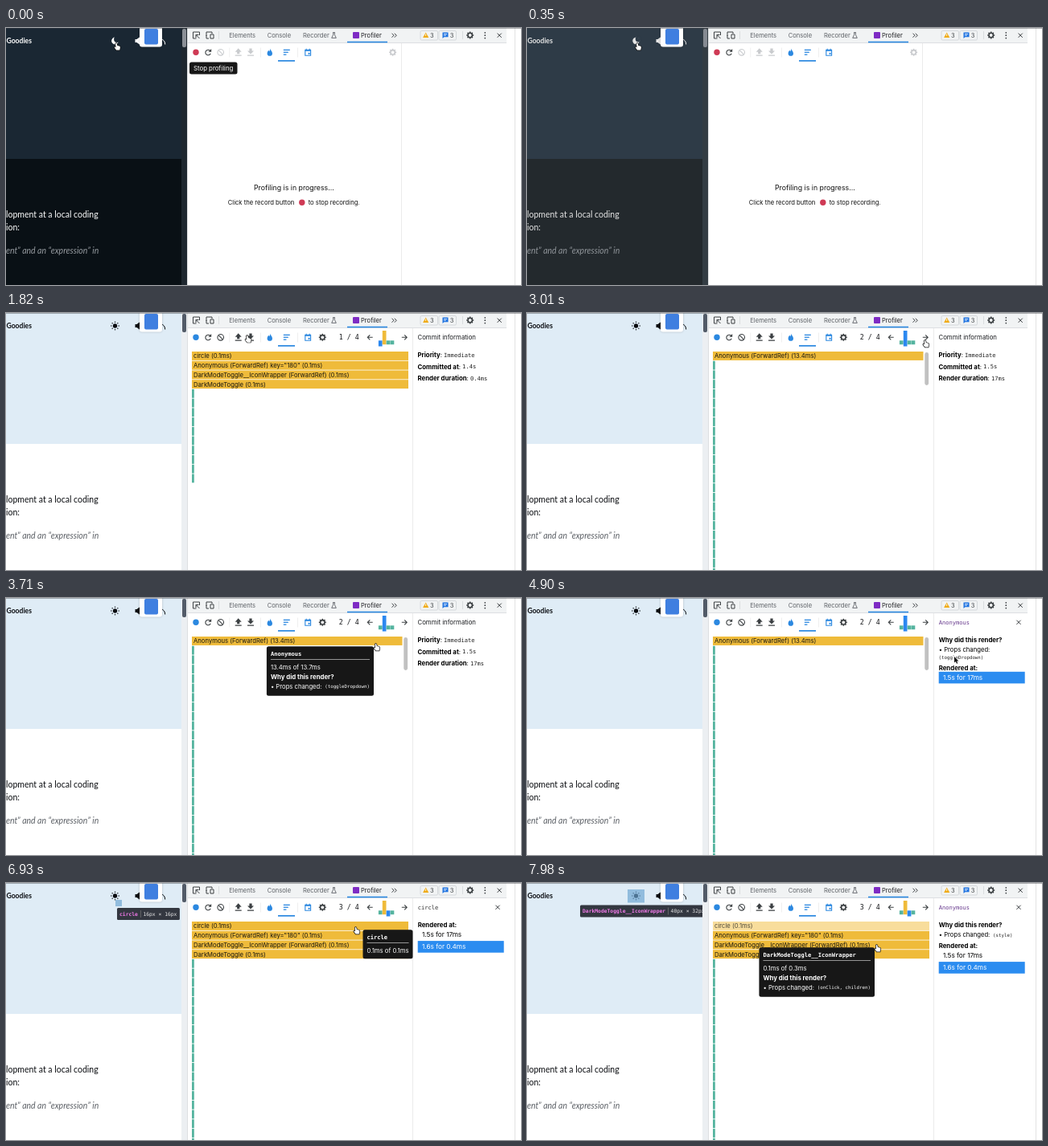
An HTML page with a canvas that plays this animation: 640 px wide and 320 px high, repeating every 8 s.

```html
<!DOCTYPE html>
<html lang="en">
<head>
<meta charset="utf-8">
<title>Profiler</title>
<style>
html, body { margin: 0; width: 100%; height: 100%; overflow: hidden; background: #fff; }
canvas { display: block; width: 640px; height: 320px; }
</style>
</head>
<body>
<canvas id="stage"></canvas>
<script>
const LOOP = 8000, STEP = 70;
const SANS = 'Inter, "Liberation Sans", sans-serif';
const MONO = '"DejaVu Sans Mono", monospace';
const PAGE = 'Lato, "Open Sans", sans-serif';
const BLUE = '#2b88e0', INK = '#3c4043', GOLD = '#efbb3a', TEAL = '#55b49f', RED = '#cf3a55';
const ROW = 11.73, TOP = 48;

const canvas = document.getElementById('stage');
const ctx = canvas.getContext('2d');
const dpr = window.devicePixelRatio || 1;
canvas.width = 640 * dpr;
canvas.height = 320 * dpr;

// Moments of the story
const THEME = 280, STOP = 1120, NEXT1 = 2310, PICK1 = 4060, NEXT2 = 5950, PICK2 = 6720, PICK3 = 7490;

const path = [
  [0, 137, 19], [420, 137, 19], [840, 231.5, 26], [1610, 231.5, 26], [2240, 494.5, 34],
  [3010, 494.5, 34], [3290, 478, 52], [3710, 459.5, 57], [4130, 459.5, 57], [4410, 510, 63],
  [4550, 510, 63], [4900, 531, 73], [5040, 531, 73], [5390, 486, 54], [5810, 494.5, 34],
  [6230, 494.5, 34], [6650, 437, 54], [6790, 434.5, 55], [7000, 434.5, 55], [7350, 434.5, 66],
  [7700, 434.5, 67], [7980, 434.5, 77]
];

const springRows = [
  { label: 'circle (0.1ms)', name: 'circle', time: '0.1ms of 0.1ms', box: [136, 21, 8, 8], size: '16px × 16px', tag: [138, 31] },
  { label: 'Anonymous (ForwardRef) key="180" (0.1ms)', name: 'Anonymous', time: '0.1ms of 0.2ms', props: '(style)', box: [136, 21, 8, 8], size: '16px × 16px', tag: [126.5, 31] },
  { label: 'DarkModeToggle__IconWrapper (ForwardRef) (0.1ms)', name: 'DarkModeToggle__IconWrapper', time: '0.1ms of 0.3ms', props: '(onClick, children)', box: [125, 8, 21, 16.5], size: '40px × 32px', tag: [66, 27.5] },
  { label: 'DarkModeToggle (0.1ms)', name: 'DarkModeToggle', time: '0.1ms of 0.4ms' }
];
const commits = {
  1: { rows: springRows, thin: 10, at: '1.4s', took: '0.4ms' },
  2: { rows: [{ label: 'Anonymous (ForwardRef) (13.4ms)', name: 'Anonymous', time: '13.4ms of 13.7ms', props: '(toggleDropdown)' }], thin: 23, scroll: true, at: '1.5s', took: '17ms' },
  3: { rows: springRows, thin: 20, at: '1.6s', took: '0.4ms' }
};

const clamp = v => Math.max(0, Math.min(1, v));
const ease = v => { v = clamp(v); return v * v * (3 - 2 * v); };

function mix(a, b, p) {
  return `rgb(${a.map((v, i) => Math.round(v + (b[i] - v) * p))})`;
}

function pointer(t) {
  let i = 0;
  while (i < path.length - 2 && t >= path[i + 1][0]) i++;
  const [t0, x0, y0] = path[i], [t1, x1, y1] = path[i + 1];
  const p = ease((t - t0) / (t1 - t0));
  return { x: x0 + (x1 - x0) * p, y: y0 + (y1 - y0) * p };
}

function rect(x, y, w, h, color) {
  ctx.fillStyle = color;
  ctx.fillRect(x, y, w, h);
}

function round(x, y, w, h, r, color) {
  ctx.fillStyle = color;
  ctx.beginPath();
  ctx.roundRect(x, y, w, h, r);
  ctx.fill();
}

function disc(x, y, r, color) {
  ctx.fillStyle = color;
  ctx.beginPath();
  ctx.arc(x, y, r, 0, 7);
  ctx.fill();
}

function ring(x, y, r, color, w = 1, from = 0, to = 7) {
  ctx.strokeStyle = color;
  ctx.lineWidth = w;
  ctx.beginPath();
  ctx.arc(x, y, r, from, to);
  ctx.stroke();
}

function shape(d, x, y, color, w) {
  const p = new Path2D(d);
  ctx.save();
  ctx.translate(x, y);
  if (w) {
    ctx.strokeStyle = color;
    ctx.lineWidth = w;
    ctx.stroke(p);
  } else {
    ctx.fillStyle = color;
    ctx.fill(p);
  }
  ctx.restore();
}

// y is the middle of the capitals; returns the right end
function text(s, x, y, color, size = 7.7, style = '', family = SANS) {
  ctx.font = `${style} ${size}px ${family}`;
  ctx.fillStyle = color;
  ctx.fillText(s, x, y + size * 0.36);
  return x + ctx.measureText(s).width;
}
const bold = (s, x, y, color, size = 7.8) => text(s, x, y, color, size, 'bold');
const mono = (s, x, y, color, size = 7.1, style = '') => text(s, x, y, color, size, style, MONO);

function gear(x, y, color) {
  ring(x, y, 2.7, color, 1.6);
  for (let k = 0; k < 8; k++) {
    const a = k * Math.PI / 4, c = Math.cos(a), s = Math.sin(a);
    shape(`M${c * 3} ${s * 3}L${c * 4.5} ${s * 4.5}`, x, y, color, 1.6);
  }
}

function cross(x, y) {
  shape('M-2.6-2.6L2.6 2.6M2.6-2.6L-2.6 2.6', x, y, INK, 1);
}

function drawPage(t) {
  const p = ease((t - THEME) / 350);
  const hero = mix([26, 39, 51], [223, 236, 246], p);
  const ink = mix([255, 255, 255], [10, 12, 16], p);
  rect(0, 0, 218, 320, mix([9, 16, 21], [255, 255, 255], p));
  rect(0, 0, 218, 163, hero);
  rect(218, 0, 7, 320, mix([30, 39, 47], [236, 239, 242], p));
  round(219, 1, 5, 23, 2, mix([139, 144, 151], [82, 91, 104], p));

  text('Goodies', 0.5, 16, ink, 8.6, 'bold', PAGE);
  text('lopment at a local coding', 0, 232.5, ink, 10.5, '', PAGE);
  text('ion:', 0, 248.5, ink, 10.5, '', PAGE);
  text('ent” and an “expression” in', 0, 277, mix([150, 155, 160], [92, 96, 102], p), 10.5, 'italic', PAGE);

  // moon turning into a sun
  disc(135.5, 16, 4.4 - 1.7 * p, ink);
  if (p < 1) disc(138 + p * 6, 14 - p * 4, 3.9, hero);
  ctx.globalAlpha = p;
  for (let k = 0; k < 8; k++) {
    const a = k * Math.PI / 4;
    disc(135.5 + Math.cos(a) * 4.7, 16 + Math.sin(a) * 4.7, 0.7, ink);
  }
  ctx.globalAlpha = 1;

  shape('M0-2H2L6-5V5L2 2H0Z', 160.5, 16, ink);
  ring(190.5, 20.5, 7.2, ink, 1, -1.3, 0);
  ctx.save();
  ctx.shadowColor = 'rgba(0,0,0,.2)';
  ctx.shadowBlur = 3 * dpr;
  round(166, -4, 28, 27.5, 3, '#fff');
  ctx.restore();
  round(172, 1, 17, 19.5, 2, '#3f7fe0');
}

function drawTabs() {
  rect(226, 0, 396, 18, '#f1f3f4');
  rect(226, 18, 396, 0.7, '#cfd2d6');
  shape('M4 4H0V-4H8V0M3.5-.5L8 4M3.5-.5V3M3.5-.5H7', 232.5, 9, INK, 1);
  shape('M0 1V-4H7V-2M0 4V0M0 4H3M5-1H9V4H5Z', 249, 9, INK, 1);
  rect(264, 4, 0.7, 10, '#d0d3d6');
  text('Elements', 277.3, 9.2, '#5f6368', 7.6);
  text('Console', 324.7, 9.2, '#5f6368', 7.6);
  text('Recorder', 369, 9.2, '#5f6368', 7.6);
  shape('M-1.5-3.5H1.5M-.8-3.5V-1L-2.8 3.2H2.8L.8-1V-3.5', 407.5, 9.2, '#5f6368', 0.9);
  round(431, 5, 8, 8, 1, '#7e2bc4');
  text('Profiler', 441, 9.2, '#202124', 7.6);
  rect(424, 16.7, 50, 1.6, BLUE);
  shape('M-3-2.5L-.5 0L-3 2.5M.3-2.5L2.8 0L.3 2.5', 482.5, 9.2, INK, 1);
  for (const x of [515, 538]) {
    ctx.strokeStyle = '#cfd2d6';
    ctx.lineWidth = 0.8;
    ctx.beginPath();
    ctx.roundRect(x, 3.5, 21.5, 11.5, 1.5);
    ctx.stroke();
  }
  shape('M0-3.5L3.6 3H-3.6Z', 521.7, 9, '#f0ab16');
  rect(521.3, 7.4, 0.8, 2.6, '#fff');
  text('3', 527, 9.3, INK, 7.4);
  shape('M-3.5-3.5H3.5V2.2H-1.5L-3.5 4Z', 546, 9, '#1f73e0');
  rect(544, 7, 4, 0.8, '#fff');
  rect(544, 8.8, 3, 0.8, '#fff');
  text('3', 551.7, 9.3, INK, 7.4);
  rect(567, 4, 0.7, 10, '#d0d3d6');
  gear(576.7, 9, INK);
  for (const y of [5.8, 9.2, 12.6]) disc(595.3, y, 0.9, INK);
  cross(613.2, 9.2);
}

function drawTools(commit) {
  const live = commit ? INK : '#c9cbce';
  disc(236, 30.3, 3.7, commit ? BLUE : RED);
  ring(251.2, 30.5, 3.3, INK, 1.1, 0.4, 5.5);
  shape('M4-4V-.2H.2Z', 251.2, 30, INK);
  ring(266.7, 30.3, 3.8, live, 1.1);
  shape('M-2.6-2.6L2.6 2.6', 266.7, 30.3, live, 1.1);
  shape('M0-5L4-.5H1.6V2H-1.6V-.5H-4ZM-4 3.3H4V4.5H-4Z', 288.7, 30.3, live);
  shape('M0 2.3L4-1.7H1.6V-4.7H-1.6V-1.7H-4ZM-4 3.3H4V4.5H-4Z', 304, 30.3, live);
  for (const x of [277.5, 316, 362]) rect(x, 24.5, 0.7, 12, '#e9e9e9');
  shape('M.3-4.6C.8-2.2 3.3-1 3.2 1.5A3.2 3.1 0 0 1-3.2 1.5C-3.2-.5-2-1.6-1.6-2.8C-1-2-.9-1.4-.7-.9C.4-2 .5-3.2.3-4.6Z', 327.8, 30.2, BLUE);
  [8, 6, 3.6].forEach((w, i) => rect(344.8, 26.7 + i * 2.9, w, 1.3, BLUE));
  rect(338, 40, 21, 1.7, BLUE);
  shape('M-3.4-3H3.4V4H-3.4ZM-2-4.5V-3M2-4.5V-3', 375.2, 30.2, BLUE, 1.1);
  rect(371.8, 27, 7, 1.8, BLUE);
  rect(375.6, 30.8, 2, 2, BLUE);

  if (!commit) {
    gear(480.6, 30.3, '#c9cbce');
    return;
  }
  gear(393.3, 30.3, INK);
  mono(commit + ' / 4', 413.8, 30.3, '#1b1d20', 8.3);
  shape('M3.2 0H-3M-.2-3L-3.2 0L-.2 3', 452.5, 30.3, INK, 1.1);
  shape('M-3.2 0H3M.2-3L3.2 0L.2 3', 495, 30.3, INK, 1.1);
  for (let k = 1; k <= 4; k++) {
    const tall = k === 2, on = k === commit;
    const y = tall ? 22 : 34.3;
    rect(458 + k * 4.9, y, 4.7, (on ? 41.5 : 39.2) - y, on ? '#2b88f0' : tall ? GOLD : TEAL);
  }
}

function drawChart(c, selected) {
  const w = c.scroll ? 261.5 : 269;
  c.rows.forEach((r, i) => {
    const y = TOP + i * ROW;
    rect(231, y, w, ROW - 0.8, i < selected ? '#f8dd9c' : GOLD);
    text(r.label, 233, y + 5.7, i < selected ? '#4f4a3a' : '#17160f');
  });
  for (let i = 0; i < c.thin; i++) {
    rect(231, TOP + (c.rows.length + i) * ROW, 2.8, ROW - 0.9, TEAL);
  }
  if (c.scroll) round(494.3, 49, 4.8, 41, 2.4, '#c1c1c1');
}

function renderedAt(y, items, active) {
  bold('Rendered at:', 511.7, y, '#000');
  items.forEach((s, i) => {
    const iy = y + 12 + i * 15;
    if (i === active) rect(511.7, iy - 7.4, 107, 14.6, '#2b8cf0');
    text(s, 517, iy, i === active ? '#fff' : '#000', 8.2);
  });
}

function drawSidebar(t, c) {
  rect(505, 19, 0.8, 301, '#e6e6e6');
  if (t < PICK1) {
    text('Commit information', 511.5, 30.3, '#1b1d20', 7.8);
    [['Priority', 'Immediate'], ['Committed at', c.at], ['Render duration', c.took]].forEach(([k, v], i) => {
      const y = 52.5 + i * 14.3;
      const x = bold(k, 511.5, y, '#000');
      mono(v, text(': ', x, y, '#000'), y, '#222');
    });
    return;
  }
  cross(611, 30.3);
  const plain = t >= PICK2 && t < PICK3;
  mono(plain ? 'circle' : 'Anonymous', 511.7, 30.3, plain ? '#333' : '#6a3d8f');
  const both = ['1.5s for 17ms', '1.6s for 0.4ms'];
  if (t < NEXT2 || t >= PICK3) {
    bold('Why did this render?', 511.7, 52.5, '#000');
    const x = text('• Props changed: ', 511.7, 64.3, '#000');
    if (t < NEXT2) {
      mono('(toggleDropdown)', 511.5, 73.8, '#222', 5.8);
      renderedAt(87.2, both.slice(0, 1), 0);
    } else {
      mono('(style)', x + 1.5, 64.5, '#222', 5.8);
      renderedAt(78.5, both, 1);
    }
  } else {
    renderedAt(52.5, plain ? both : both.slice(0, 1), plain ? 1 : -1);
  }
}

function drawTip(r, x, y) {
  const why = '• Props changed: ';
  ctx.font = `7.7px ${SANS}`;
  let w = ctx.measureText(r.time).width;
  const lead = ctx.measureText(why).width + 1.5;
  if (r.props) {
    ctx.font = `5.8px ${MONO}`;
    w = Math.max(w, lead + ctx.measureText(r.props).width);
  }
  ctx.font = `bold 7.1px ${MONO}`;
  w = Math.max(w, ctx.measureText(r.name).width) + 10;
  const left = x + 9 + w < 510 ? x + 9 : x - 2.5 - w;
  const top = y + 3.3, tx = left + 5;
  round(left, top, w, r.props ? 61.5 : 36, 2.5, '#171717');
  mono(r.name, tx, top + 9.3, '#fff', 7.1, 'bold');
  rect(tx, top + 15.8, w - 10, 0.8, '#b5b5b5');
  text(r.time, tx, top + 26.2, '#fff');
  if (r.props) {
    bold('Why did this render?', tx, top + 38, '#fff');
    text(why, tx, top + 49.8, '#fff');
    mono(r.props, tx + lead, top + 50, '#fff', 5.8);
  }
}

function drawHighlight(r) {
  ctx.save();
  ctx.beginPath();
  ctx.rect(0, 0, 218, 320);
  ctx.clip();
  rect(...r.box, 'rgba(110,165,210,.68)');
  const [x, y] = r.tag;
  ctx.font = `bold 6.35px ${MONO}`;
  const mid = x + 3 + ctx.measureText(r.name).width + 3;
  round(x, y, mid - x + 49, 15, 1.5, '#333740');
  mono(r.name, x + 3, y + 7.5, '#ee78e6', 6.35, 'bold');
  rect(mid, y + 3, 0.7, 9, '#777');
  mono(r.size, mid + 3.5, y + 7.5, '#e6e6e6', 6.35);
  ctx.restore();
}

function drawPointer({ x, y }) {
  const arrow = x > 506 || (x > 150 && x < 226);
  const d = arrow
    ? 'M0 0V7.6L1.8 6L3 8.8L4.3 8.2L3.1 5.5H5.4Z'
    : 'M-.9.6Q0-.8 .9.6L1.3 3L3.9 3.6Q5.2 4 4.9 5.4L4.2 8.6H.1L-2.1 5.6Q-2.6 4.4-1.5 4.5L-.4 5.2Z';
  shape(d, x, y, arrow ? '#fff' : '#111', 1.4);
  shape(d, x, y, arrow ? '#111' : '#fff');
}

function draw(t) {
  ctx.setTransform(dpr, 0, 0, dpr, 0, 0);
  rect(0, 0, 640, 320, '#fff');
  drawPage(t);
  rect(225, 0, 0.8, 320, '#d5d7da');
  drawTabs();

  const commit = t < STOP ? 0 : t < NEXT1 ? 1 : t < NEXT2 ? 2 : 3;
  const pos = pointer(t);
  drawTools(commit);
  if (commit) {
    const c = commits[commit];
    drawChart(c, t >= PICK3 ? 1 : 0);
    drawSidebar(t, c);
    const hover = pos.x < 492 ? c.rows[Math.floor((pos.y - TOP) / ROW)] : null;
    if (hover) {
      if (hover.box) drawHighlight(hover);
      drawTip(hover, pos.x, pos.y);
    }
  } else {
    rect(491, 19, 0.8, 301, '#e6e6e6');
    text('Profiling is in progress...', 308, 199.3, '#111', 8.75);
    text('Click the record button', 275.7, 217.3, '#111', 7.65);
    disc(367.8, 217.2, 3.7, RED);
    text('to stop recording.', 375.7, 217.3, '#111', 7.65);
    if (t < 70) {
      round(228, 42.5, 59.5, 15, 2.5, '#171717');
      text('Stop profiling', 233, 50, '#fff', 7.8);
    }
  }
  rect(632, 0, 0.8, 320, '#dcdcdc');
  rect(0, 0, 640, 0.8, 'rgba(60,64,68,.5)');
  drawPointer(pos);
}

const start = performance.now();
function tick() {
  const t = (performance.now() - start) % LOOP;
  draw(Math.floor(t / STEP) * STEP);
  requestAnimationFrame(tick);
}
tick();
</script>
</body>
</html>
```
